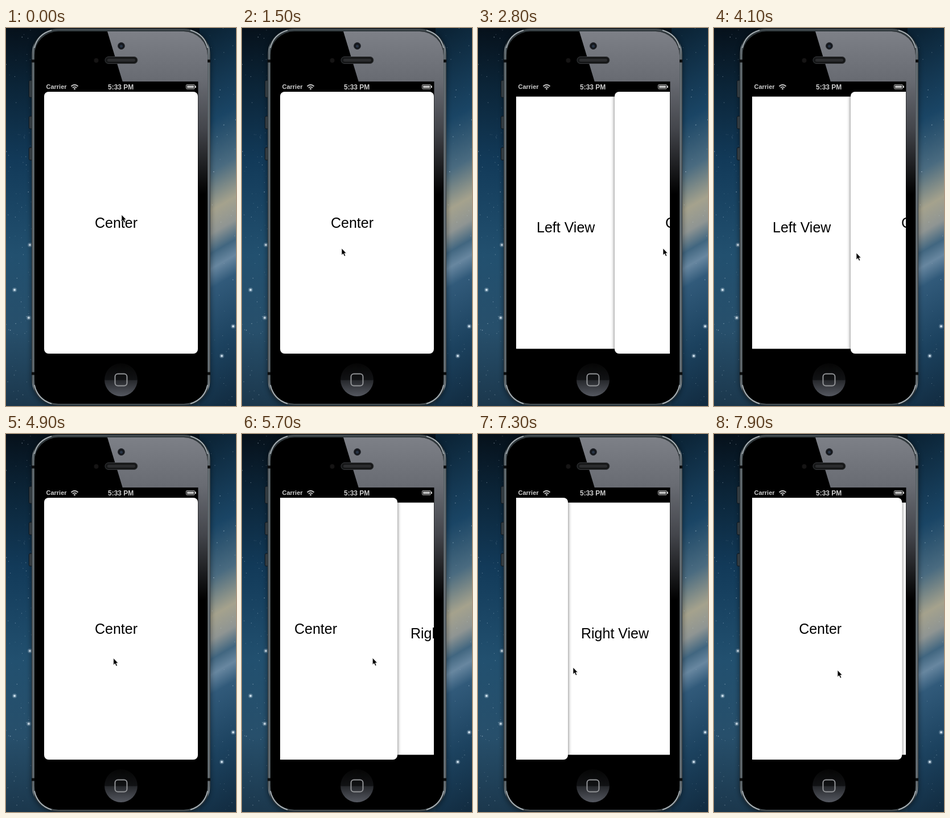
Recreate the animation shown at these times as an HTML page. Size 404x664 px, loop 8 s.

```html
<!DOCTYPE html>
<html lang="en">
<head>
<meta charset="utf-8">
<title>Sliding panels</title>
<style>
  html, body { margin: 0; width: 100%; height: 100%; overflow: hidden; background: #12334f; }
  svg { display: block; width: 404px; height: 664px; }
  text { font-family: "Liberation Sans", Arial, sans-serif; }
  .label { font-size: 25px; }
  .status { font-weight: bold; fill: #ccc; }
</style>
</head>
<body>
<svg viewBox="0 0 404 664">
  <defs>
    <linearGradient id="sky" x2="0" y2="1">
      <stop offset="0" stop-color="#06111b"/>
      <stop offset=".15" stop-color="#0b2437"/>
      <stop offset=".35" stop-color="#123a59"/>
      <stop offset=".6" stop-color="#22506f"/>
      <stop offset=".8" stop-color="#274f6b"/>
      <stop offset="1" stop-color="#1b374c"/>
    </linearGradient>
    <linearGradient id="galaxy" gradientUnits="userSpaceOnUse" x1="360" y1="0" x2="655" y2="513">
      <stop offset="0" stop-color="#0b2335"/>
      <stop offset=".24" stop-color="#1a4565"/>
      <stop offset=".37" stop-color="#4a6b80"/>
      <stop offset=".47" stop-color="#a5a28d"/>
      <stop offset=".53" stop-color="#8f9593"/>
      <stop offset=".58" stop-color="#416680"/>
      <stop offset=".62" stop-color="#6887a0"/>
      <stop offset=".67" stop-color="#315a7a"/>
      <stop offset=".83" stop-color="#1c425f"/>
      <stop offset="1" stop-color="#122c41"/>
    </linearGradient>
    <linearGradient id="rim" x2="1" y2="0">
      <stop offset="0" stop-color="#20272b"/>
      <stop offset=".008" stop-color="#7d878c"/>
      <stop offset=".018" stop-color="#30383c"/>
      <stop offset=".982" stop-color="#30383c"/>
      <stop offset=".992" stop-color="#8b9499"/>
      <stop offset="1" stop-color="#252c30"/>
    </linearGradient>
    <linearGradient id="gloss" gradientUnits="userSpaceOnUse" x1="0" y1="6" x2="0" y2="292">
      <stop offset="0" stop-color="#7d8087"/>
      <stop offset=".3" stop-color="#686b72"/>
      <stop offset=".6" stop-color="#43454b"/>
      <stop offset="1" stop-color="#000"/>
    </linearGradient>
    <linearGradient id="button" x2="0" y2="1">
      <stop offset="0" stop-color="#050505"/>
      <stop offset=".5" stop-color="#111214"/>
      <stop offset=".52" stop-color="#26282c"/>
      <stop offset="1" stop-color="#555860"/>
    </linearGradient>
    <filter id="soft" x="-20%" y="-20%" width="140%" height="140%"><feGaussianBlur stdDeviation="4"/></filter>
    <filter id="shade" x="-10%" y="-5%" width="120%" height="110%">
      <feDropShadow dx="0" dy="0" stdDeviation="3" flood-opacity=".6"/>
    </filter>
    <clipPath id="face"><rect x="50" y="6" width="304" height="654" rx="42"/></clipPath>
    <clipPath id="screen"><rect x="67" y="95" width="270" height="477"/></clipPath>
  </defs>

  <rect width="404" height="664" fill="url(#sky)"/>
  <rect x="340" width="64" height="664" fill="url(#galaxy)"/>
  <g id="stars" fill="#dcecf8"/>

  <!-- phone body -->
  <g fill="#3c474e" stroke="#11191e">
    <rect x="40.500" y="92" width="7" height="30" rx="2"/>
    <rect x="40.500" y="155" width="7" height="22" rx="2"/>
    <rect x="40.500" y="210" width="7" height="22" rx="2"/>
  </g>
  <rect x="44" y="1" width="316" height="666" rx="48" opacity=".4" filter="url(#soft)"/>
  <rect x="45" y="1" width="314" height="662" rx="46" fill="url(#rim)"/>
  <rect x="47.500" y="3" width="309" height="658" rx="44" fill="none" stroke="#596268"/>
  <path d="M50 627Q55 652 80 660M354 627Q349 652 324 660M50 35Q55 11 80 4M354 35Q349 11 324 4"
        fill="none" stroke="#b4bcc1" stroke-width="1.500"/>
  <path d="M45 58h5M354 58h5M45 607h5M354 607h5" stroke="#0b0d0e" stroke-width="5"/>
  <rect x="50" y="6" width="304" height="654" rx="42"/>
  <path d="M178 6L205 95H337V292H354V6Z" fill="url(#gloss)" clip-path="url(#face)"/>
  <circle cx="202.500" cy="31.500" r="6" fill="#15181d" stroke="#303238"/>
  <circle cx="202.500" cy="32" r="2.500" fill="#293546"/>
  <circle cx="158.500" cy="57" r="4" fill="#151414"/>
  <rect x="174" y="50.500" width="57" height="12" rx="6" fill="#161718" stroke="#393b3e"/>
  <rect x="178" y="54" width="49" height="5" rx="2.500" fill="#2b2c2e"/>
  <circle cx="202" cy="618" r="29" fill="url(#button)"/>
  <rect x="191.500" y="607.500" width="21" height="21" rx="5" fill="none" stroke="#919396" stroke-width="2"/>

  <!-- screen -->
  <rect x="64" y="94" width="273.500" height="482"/>
  <g clip-path="url(#screen)">
    <rect x="67" y="120.500" width="270" height="443" fill="#fff"/>
    <text class="label" id="left" y="359">Left View</text>
    <text class="label" id="right" y="359">Right View</text>
    <g id="center">
      <rect x="67" y="112" width="270" height="460" rx="8" fill="#fff" filter="url(#shade)"/>
      <text class="label" x="156" y="351">Center</text>
    </g>
    <rect x="67" y="95" width="270" height="17"/>
  </g>
  <text class="status" x="70.500" y="107" font-size="11">Carrier</text>
  <text class="status" x="179" y="107.500" font-size="12">5:33 PM</text>
  <g fill="none" stroke="#ccc" stroke-width="1.800">
    <path d="M114.500 102.500Q120.500 97 126.500 102.500M117 105Q120.500 101.700 124 105"/>
    <circle cx="120.500" cy="106.700" r=".6"/>
  </g>
  <rect x="316.500" y="99.500" width="15" height="7.500" rx="1.500" fill="none" stroke="#bbb"/>
  <path d="M318 101h12v4.500h-12zM332 101.500h2v3.500h-2z" fill="#bbb"/>

  <path id="cursor" d="M0 0V12L2.700 9.500L4.800 14L6.800 13.100L4.900 8.700H8.300Z" stroke="#fff" stroke-width=".7"/>
</svg>
<script>
  const el = id => document.getElementById(id);
  const LOOP = 8000, STEP = 100;

  // Eased gestures: when they run, how far the panel slides and the pointer travels.
  const gestures = [
    { from: 300, to: 1100, slide: 0, dx: -28, dy: 59 },
    { from: 1600, to: 2500, slide: 173, dx: 150, dy: 0 },
    { from: 2900, to: 3700, slide: 0, dx: -75, dy: 8 },
    { from: 4100, to: 4800, slide: -173, dx: -70, dy: 0 },
    { from: 4800, to: 5300, slide: 0, dx: 84, dy: -11 },
    { from: 5300, to: 6290, slide: -179, dx: -97, dy: 26 },
    { from: 7300, to: 7980, slide: 179, dx: 52, dy: 5 }
  ];

  function ease(t, from, to) {
    const p = Math.min(1, Math.max(0, (t - from) / (to - from)));
    return p * p * (3 - 2 * p);
  }

  const travel = (key, t) =>
    gestures.reduce((sum, g) => sum + g[key] * ease(t, g.from, g.to), 0);

  let seed = 11;
  const random = () => (seed = seed * 16807 % 2147483647) / 2147483647;

  const star = (x, y, r, opacity) => `<circle cx="${x}" cy="${y}" r="${r}" opacity="${opacity}"/>`;

  function drawStars() {
    let out = "";
    for (let i = 0; i < 150; i++) {
      const x = i % 3 ? random() * 46 : 358 + random() * 46;
      out += star(x, random() * 664, .3 + random() * .5, .2 + random() * .4);
    }
    const bright = [[42, 381], [40, 509], [15, 460], [379, 576], [399, 524]];
    for (const [x, y] of bright) out += star(x, y, 4, .25) + star(x, y, 2, .9);
    el("stars").innerHTML = out;
  }

  function frame(now) {
    const t = Math.floor(now % LOOP / STEP) * STEP;
    const x = travel("slide", t);
    el("center").setAttribute("transform", `translate(${x})`);
    el("left").setAttribute("x", x - 70);
    el("right").setAttribute("x", x + 360);
    el("cursor").setAttribute("transform", `translate(${203 + travel("dx", t)} ${328 + travel("dy", t)})`);
    requestAnimationFrame(frame);
  }

  drawStars();
  requestAnimationFrame(frame);
</script>
</body>
</html>
```
